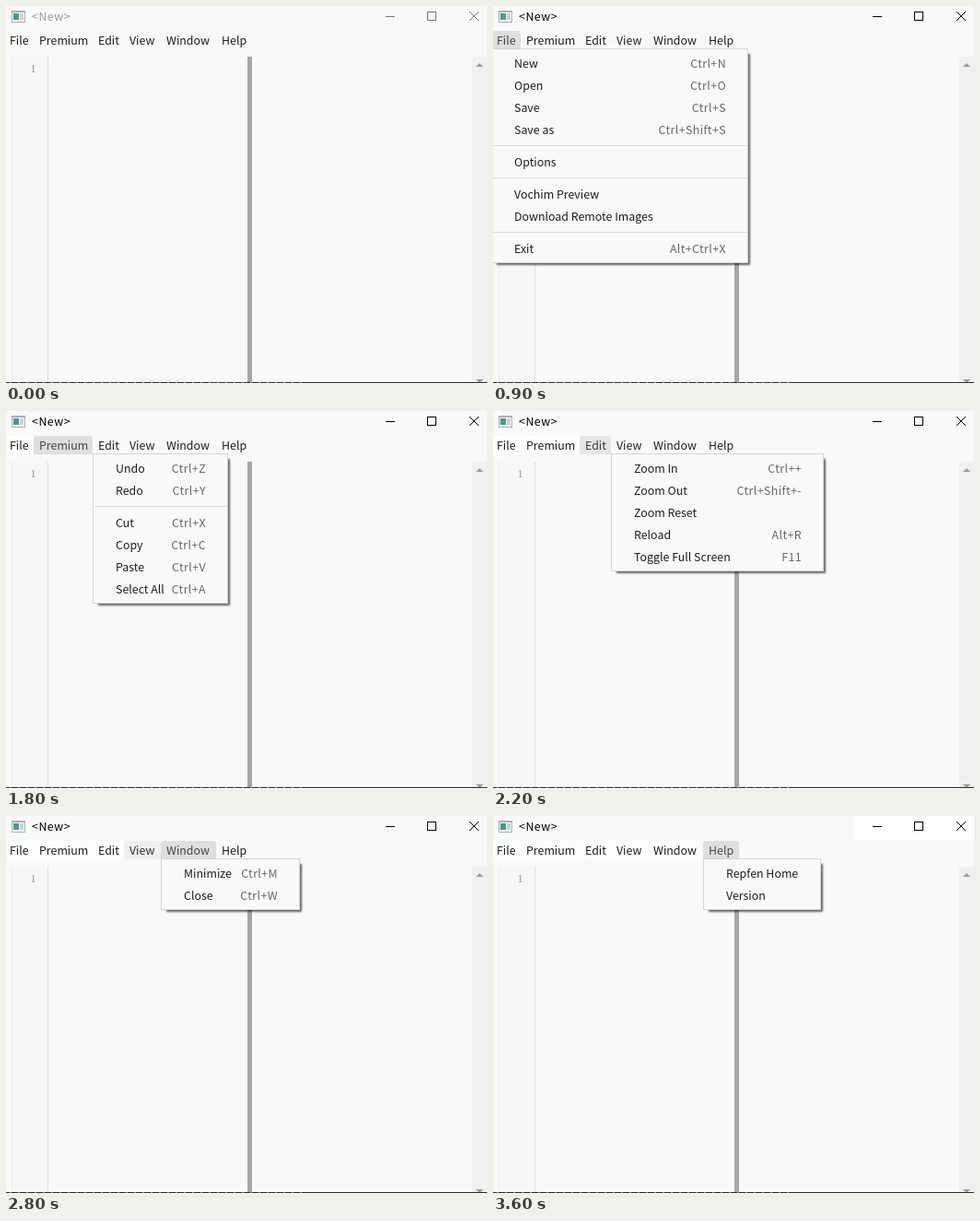
These frames come from a looping animation (522x409 px, 3.8 s). An HTML page with a canvas:

```html
<!DOCTYPE html>
<html lang="en">
<head>
<meta charset="utf-8">
<title>Editor menus</title>
<style>
html, body { margin: 0; width: 100%; height: 100%; overflow: hidden; background: #f8faf9; }
canvas { display: block; }
</style>
</head>
<body>
<canvas id="stage" width="522" height="409"></canvas>
<script>
const ctx = document.getElementById('stage').getContext('2d');
const LOOP = 3800, BG = '#f8faf9';
const UI = '12.4px "Noto Sans CJK SC", "Noto Sans CJK JP", "Noto Sans CJK", Lato, sans-serif';

// x and w: bar button; left and right: popup edges; null: separator
const menus = [
  { name: 'File', x: 0, w: 30, left: -2, right: 277, items: [
    ['New', 'Ctrl+N'], ['Open', 'Ctrl+O'], ['Save', 'Ctrl+S'], ['Save as', 'Ctrl+Shift+S'], null,
    ['Options'], null, ['Vochim Preview'], ['Download Remote Images'], null, ['Exit', 'Alt+Ctrl+X']] },
  { name: 'Premium', x: 30, w: 64, left: 30, right: 207, items: [
    ['MyLoremundiana Login'], ['Calquix Mathjax'], ['Upload Local Images']] },
  { name: 'Edit', x: 94, w: 34, left: 94, right: 241, items: [
    ['Undo', 'Ctrl+Z'], ['Redo', 'Ctrl+Y'], null, ['Cut', 'Ctrl+X'], ['Copy', 'Ctrl+C'],
    ['Paste', 'Ctrl+V'], ['Select All', 'Ctrl+A']] },
  { name: 'View', x: 128, w: 40, left: 128, right: 359, items: [
    ['Zoom In', 'Ctrl++'], ['Zoom Out', 'Ctrl+Shift+-'], ['Zoom Reset'], ['Reload', 'Alt+R'],
    ['Toggle Full Screen', 'F11']] },
  { name: 'Window', x: 168, w: 60, left: 168, right: 319, items: [
    ['Minimize', 'Ctrl+M'], ['Close', 'Ctrl+W']] },
  { name: 'Help', x: 228, w: 39, left: 228, right: 356, items: [['Repfen Home'], ['Version']] }
];

// time, open menu, highlight of the previous button, highlight of the open one
const steps = [
  [0, -1, 0, 0],
  [700, 0, 0, 0], [800, 0, 0, .5], [900, 0, 0, 1],
  [1200, 1, 1, 0], [1300, 1, .5, .5], [1400, 1, 0, 1],
  [1800, 2, 1, 0], [1900, 2, .5, .5], [2000, 2, 0, .9],
  [2200, 3, .8, 0], [2300, 3, .4, .9],
  [2500, 4, 1, 0], [2600, 4, .8, .4], [2700, 4, .6, .8], [2800, 4, .45, 1],
  [3000, 5, 1, 0], [3100, 5, .5, .5], [3200, 5, 0, 1]
];

function rect(x, y, w, h, color) {
  ctx.fillStyle = color;
  ctx.fillRect(x, y, w, h);
}

function text(str, x, y, color = '#1c1c1c', align = 'left', spacing = 0, font = UI) {
  ctx.font = font;
  ctx.letterSpacing = spacing + 'px';
  ctx.textAlign = align;
  ctx.fillStyle = color;
  ctx.fillText(str, x, y);
}

function arrow(y, dir) {
  ctx.fillStyle = '#9a9a9a';
  ctx.beginPath();
  ctx.moveTo(510, y);
  ctx.lineTo(518, y);
  ctx.lineTo(514, y - 4 * dir);
  ctx.fill();
}

function titleBar(active, t) {
  const late = t >= 3500, hover = late && t < 3600;
  const ink = active ? '#000' : '#777';
  if (late) rect(393, 0, 129, 26, '#fff');
  if (hover) rect(486, 0, 36, 26, '#e81123');

  rect(6, 5, 15, 13, '#a9b2b2');
  rect(7, 7, 13, 10, '#f1f5f4');
  rect(8, 8, 6, 7, '#5a928b');
  rect(15, 8, 4, 7, '#c6d6d3');

  text('<New>', 28, 16, active ? '#000' : '#999', 'left', .5);
  rect(412, 11, 10, 1, ink);
  ctx.strokeStyle = ink;
  ctx.lineWidth = 1;
  ctx.strokeRect(457.5, 6.5, 9, 9);
  ctx.strokeStyle = hover ? '#fff' : ink;
  ctx.beginPath();
  ctx.moveTo(503, 6);
  ctx.lineTo(513, 16);
  ctx.moveTo(513, 6);
  ctx.lineTo(503, 16);
  ctx.stroke();
}

function editor() {
  rect(6, 55, 39, 354, '#f7f7f7');
  rect(6, 55, 1, 354, '#eeeeee');
  rect(45, 55, 1, 354, '#dddddd');
  text('1', 29.5, 72, '#999', 'center', 0, '13px "Liberation Serif", serif');
  rect(262, 55, 5, 354, '#a6a6a6');
  rect(506, 55, 16, 354, '#f0f0f0');
  arrow(66, 1);
  arrow(405, -1);
  rect(0, 408, 522, 1, '#2b2b2b');
  for (let x = 4; x < 322; x += 9) rect(x, 408, 1 + x % 3, 1, '#8c8c8c');
}

function button(menu, level, visited) {
  if (visited) rect(menu.x, 27, menu.w, 20, '#fdfdfd');
  if (level) {
    const grey = 253 - 30 * level;
    ctx.fillStyle = `rgb(${grey},${grey},${grey})`;
    ctx.beginPath();
    ctx.roundRect(menu.x, 27, menu.w, 20, [3, 3, 0, 0]);
    ctx.fill();
  }
  const shade = 28 + 40 * level;
  text(menu.name, menu.x + (menu.x ? 6 : 4), 42, `rgb(${shade},${shade},${shade})`);
}

function popup({ left, right, items }) {
  const w = right - left;
  const h = items.reduce((sum, item) => sum + (item ? 24 : 11), 8);
  ctx.save();
  ctx.shadowColor = 'rgba(0,0,0,.6)';
  ctx.shadowBlur = 2;
  ctx.shadowOffsetX = ctx.shadowOffsetY = 2;
  rect(left + 4, 50, w - 4, h - 4, BG);
  ctx.restore();
  rect(left, 46, w, h, '#d4d4d4');
  rect(left + 1, 47, w - 2, h - 2, BG);

  let y = 50;
  for (const item of items) {
    if (!item) {
      rect(left + 2, y + 5, w - 3, 1, '#dcdcdc');
      y += 11;
      continue;
    }
    text(item[0], left + 25, y + 17);
    if (item[1]) text(item[1], right - 24, y + 17, '#666', 'right', .4);
    y += 24;
  }
}

function draw(now) {
  const t = now % LOOP;
  const [, open, before, current] = steps.findLast(step => step[0] <= t);
  rect(0, 0, 522, 409, BG);
  titleBar(open >= 0, t);
  editor();
  menus.forEach((menu, i) => {
    const level = i === open ? current : i === open - 1 ? before : 0;
    button(menu, level, i < open);
  });
  if (open >= 0) popup(menus[open]);
}

const start = performance.now();
function frame() {
  draw(performance.now() - start);
  requestAnimationFrame(frame);
}
frame();
</script>
</body>
</html>
```
